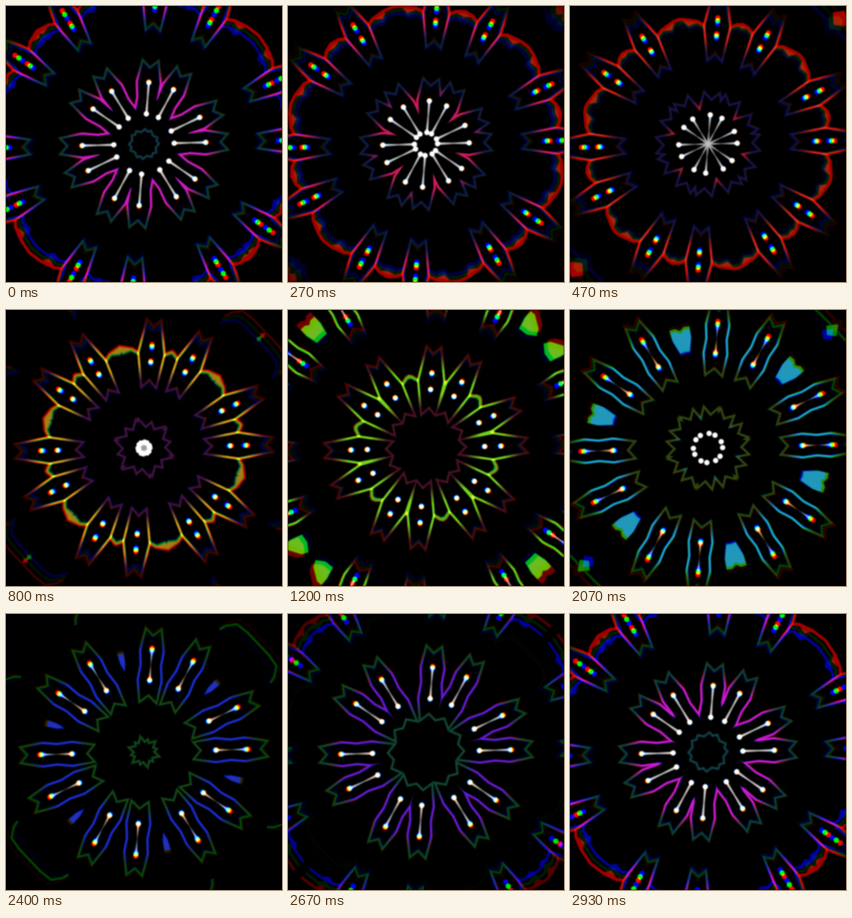
Write an HTML page with a canvas that moves like this. It is 480 px wide and 480 px high and loops after 2.99 s.

```html
<!DOCTYPE html>
<html lang="en">
<head>
<meta charset="utf-8">
<title>Kaleidoscope</title>
<style>
html, body { margin: 0; width: 100%; height: 100%; overflow: hidden; background: #000; }
canvas { display: block; width: 480px; height: 480px; filter: blur(.9px); }
</style>
</head>
<body>
<canvas id="stage" width="480" height="480"></canvas>
<script>
const ctx = document.getElementById('stage').getContext('2d');
const LOOP = 2990, STEPS = 45, SPEED = 8.1, PITCH = SPEED * STEPS / 2;
const RAD = Math.PI / 180;
const clamp = (v, lo = 0, hi = 1) => Math.min(hi, Math.max(lo, v));
let channel = 0; // 0 red, 1 green, 2 blue

// Lens: slight barrel squeeze plus a colour split that grows with the radius
function lens(u, y) {
  const r = Math.hypot(u, y);
  const k = 1 - 8 / 248 * (r / 248) ** 3 + (1 - channel) * .025 * r / 240;
  return [u * k, y * k];
}

// Only the current channel of a colour is painted
function paint(value, alpha = 1) {
  const rgb = [0, 0, 0];
  rgb[channel] = Math.round(255 * value);
  return `rgba(${rgb},${alpha})`;
}

function hsl(h, s, l, alpha) {
  const k = ([0, 8, 4][channel] + h / 30) % 12;
  return paint(l - s * Math.min(l, 1 - l) * Math.max(-1, Math.min(k - 3, 9 - k, 1)), alpha);
}

function trace(center, points, closed) {
  ctx.beginPath();
  for (const [u, y] of points) ctx.lineTo(...lens(center + u, y));
  if (closed) ctx.closePath();
}

function fill(center, points, style) {
  trace(center, points, true);
  ctx.fillStyle = style;
  ctx.fill();
}

function gradient(from, to, stops) {
  const g = ctx.createLinearGradient(lens(from, 0)[0], 0, lens(to, 0)[0], 0);
  for (const [at, style] of stops) g.addColorStop(at, style);
  return g;
}

function dot(u) {
  if (u < 8) return;
  ctx.beginPath();
  ctx.arc(...lens(u, 0), 4.7, 0, 7);
  ctx.fillStyle = paint(1);
  ctx.fill();
}

function petal(c, long, main, dim) {
  const tip = long ? 67 : 60, notch = tip - 13;
  const half = long
    ? [[tip, 14], [27, 21], [0, 18], [-27, 21], [-tip, 15]]
    : [[tip, 13], [0, 23], [-tip, 13]];
  const other = half.map(([u, y]) => [u, -y]).reverse();
  trace(c, [[notch, 0], ...half, [-notch, 0], ...other], true);
  const edge = long ? .2 : .25;
  ctx.strokeStyle = gradient(c - tip, c + tip,
    [[0, dim], [.1, dim], [edge + .08, main], [.92 - edge, main], [.9, dim], [1, dim]]);
  ctx.lineWidth = 4;
  ctx.stroke();
}

function stem(c, gap) {
  const mid = clamp(Math.min((175 - c) / 90, (c + 20) / 90), .1, .85) + clamp((c - 215) / 50, 0, .6);
  const thin = .4 + mid * 1.2;
  fill(c, [[-gap, -2.2], [0, -thin], [gap, -2.2], [gap, 2.2], [0, thin], [-gap, 2.2]],
    gradient(c - gap, c + gap, [[0, paint(.85)], [.5, paint(.8 * mid)], [1, paint(.85)]]));
}

const BLOB = [[-27, 45], [0, 45], [20, 50], [18, 60], [-6, 78], [-22, 80], [-30, 62]];
const BRIDGE = [[2, 22], [8, 34], [10, 60], [6, 90], [0, 90], [4, 60], [-5, 50], [2, 36], [-4, 22]];
const STAR = [[-92, 96], [-70, 85], [-52, 104], [-72, 120]];
const HOOK = [[-75, 14], [-62, 22], [-48, 38], [-52, 62], [-62, 92]];

function cell(c, long, hue) {
  const main = hsl(hue, .78, .46), dim = hsl(hue + 250, .6, .17);
  const far = clamp((c - 300) / 30) * clamp((430 - c) / 30);
  ctx.globalAlpha = clamp((330 - c) / 30);
  for (const side of [1, -1]) {
    const shape = long ? BLOB : BRIDGE;
    fill(c, shape.map(([u, y]) => [u, y * side]), hsl(hue, .7, long ? .43 : .38));
  }
  petal(c, long, main, dim);
  const gap = long ? 27.5 : 14.3;
  if (long) stem(c, gap);
  dot(c + gap);
  dot(c - gap);
  if (far) {
    ctx.globalAlpha = far;
    fill(c, STAR.map(([u, y]) => [u, -y]), hsl(hue, .7, .38));
    trace(c, HOOK.map(([u, y]) => [u, -y]));
    ctx.strokeStyle = dim;
    ctx.lineWidth = 4;
    ctx.stroke();
  }
  ctx.globalAlpha = 1;
}

// One mirror wedge, 18 degrees to one side of its axis and 12 to the other
function wedge(angle, flip, step) {
  ctx.save();
  ctx.translate(240, 240);
  ctx.rotate((angle - 90) * RAD);
  ctx.scale(1, flip);
  ctx.beginPath();
  ctx.moveTo(0, 0);
  for (const a of [-18, 12]) ctx.lineTo(420 * Math.cos(a * RAD), 420 * Math.sin(a * RAD));
  ctx.clip();
  for (let i = 0; i < 5; i++) {
    const c = 80 + PITCH * i - SPEED * step;
    if (c > -80 && c < 440) cell(c, i % 2 === 0, 306 + 8 * step);
  }
  ctx.restore();
}

function draw(now) {
  const step = Math.floor((now % LOOP + 5) / (LOOP / STEPS)) % STEPS;
  ctx.globalCompositeOperation = 'source-over';
  ctx.fillStyle = '#000';
  ctx.fillRect(0, 0, 480, 480);
  ctx.globalCompositeOperation = 'lighter';
  for (channel = 0; channel < 3; channel++) {
    for (let turn = 0; turn < 360; turn += 60) {
      wedge(4.5 + turn, 1, step);
      wedge(28.5 + turn, -1, step);
    }
  }
}

const start = performance.now();
function tick() {
  draw(performance.now() - start);
  requestAnimationFrame(tick);
}
tick();
</script>
</body>
</html>
```
